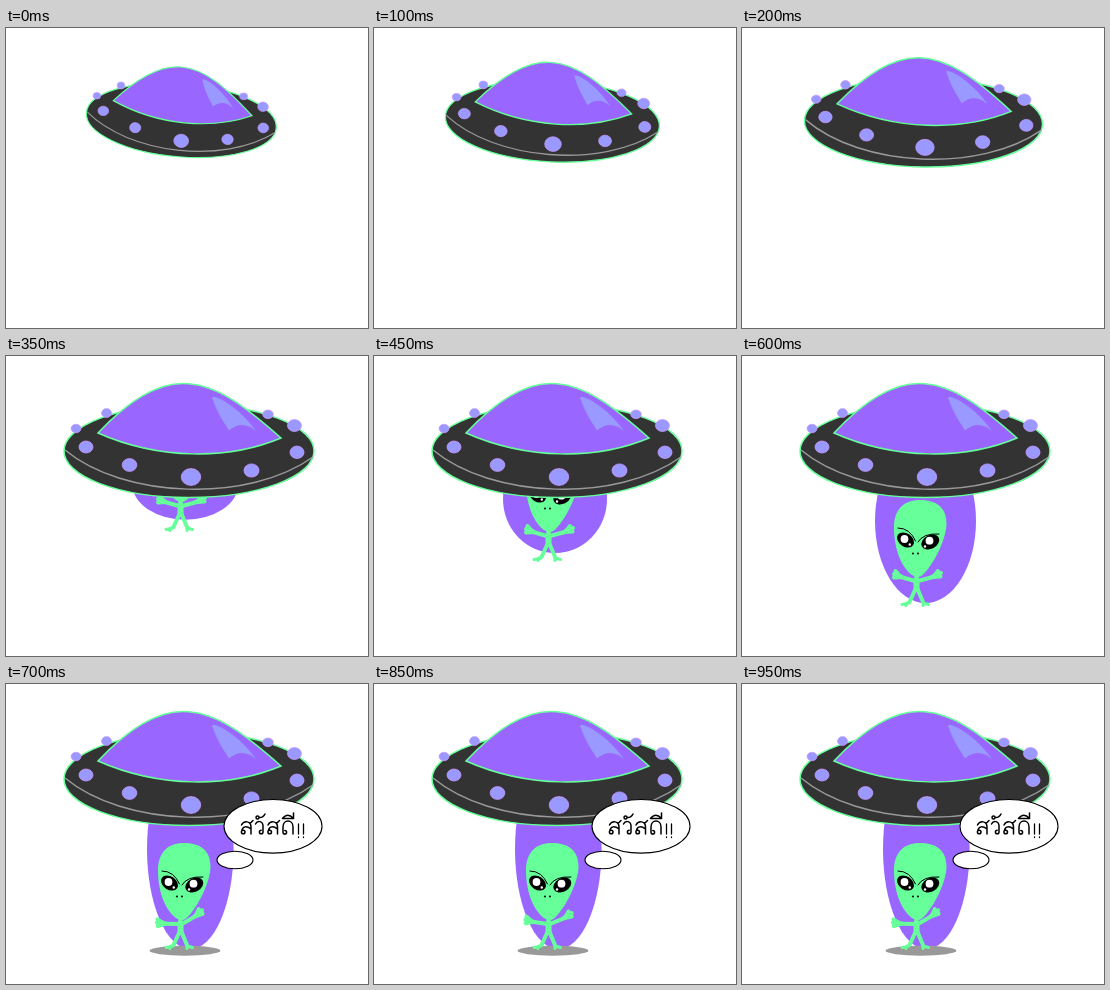
An HTML page for the animation above (1 s loop, 362 by 300 pixels).

```html
<!DOCTYPE html>
<html lang="th">
<head>
<meta charset="utf-8">
<title>Saucer greeting</title>
<style>
  html, body { margin: 0; width: 100%; height: 100%; overflow: hidden; background: #fff; }
  svg { display: block; width: 362px; height: 300px; }
  .line { fill: none; stroke: #000; stroke-linecap: round; stroke-linejoin: round; }
  .limb { fill: none; stroke: #6f9; stroke-linecap: round; stroke-linejoin: round; }
</style>
</head>
<body>
<svg viewBox="0 0 362 300">
  <ellipse id="beam" fill="#96f"/>
  <ellipse id="shadow" cx="179" cy="266.700" rx="35.500" ry="5" fill="#999"/>

  <g id="alien">
    <g class="limb">
      <path stroke-width="4" d="M174.500 219V234M173 234L167.500 246M176 234L181 246"/>
      <path stroke-width="6" d="M174.500 224V233"/>
      <path stroke-width="3" d="M167 247L160 248.500M165 247L164 249.500M181 247L186.500 248.500M181 247V249.500"/>
    </g>
    <g id="armL" class="limb">
      <path stroke-width="4" d="M173 225L159 221"/>
      <path stroke-width="4" d="M160 221L152 221.500M158 219.500L152 218M157 219L153.500 215"/>
    </g>
    <g id="armR" class="limb">
      <path stroke-width="4" d="M176 225L191 221"/>
      <path stroke-width="4" d="M190 221L198.500 220.500M192 219.500L199 217M193 219L196 215"/>
    </g>
    <path fill="#6f9" d="M178 144C196 144 205 153 204.500 169C203 188 189 212 180 219.500Q175 223 170 219C158 210 152 190 152 172C152 153 162 144 178 144Z"/>
    <ellipse rx="9.300" ry="6.600" transform="translate(163.500 184) rotate(35)"/>
    <ellipse rx="9.500" ry="6.800" transform="translate(188.300 186) rotate(-28)"/>
    <g fill="#fff">
      <circle cx="162.500" cy="183" r="3.900"/>
      <circle cx="187.500" cy="184.700" r="3.900"/>
      <circle cx="167.800" cy="188.500" r="1.200"/>
      <circle cx="183" cy="190.500" r="1.200"/>
    </g>
    <path class="line" d="M156 172Q168 172 173.500 185M176 186Q181 177 197 178"/>
    <circle cx="171" cy="197.500" r="1"/>
    <circle cx="176" cy="197.500" r="1"/>
  </g>

  <g id="saucer">
    <ellipse cx="183" cy="95" rx="125" ry="46.500" fill="#333" stroke="#6f9" stroke-width="1.500"/>
    <path d="M59 94C118 143 243 147 307 101" fill="none" stroke="#999" stroke-width="1.500"/>
    <path d="M92 77C122 45 150 27.500 177 27.500C209 27.500 238 49 275 82C223 104 153 104 92 77Z" fill="#96f" stroke="#6f9" stroke-width="1.500"/>
    <path d="M206 41C209 53 217 65 223 74.500C231 67 241 67 250 75C241 61 221 44 209 41Z" fill="#99f"/>
    <g id="lights" fill="#99f" stroke="#c9f" stroke-width=".8"></g>
  </g>

  <g id="bubble">
    <g fill="#fff" stroke="#000" stroke-width="1.100">
      <ellipse cx="267" cy="142.300" rx="49" ry="26.800"/>
      <ellipse cx="229" cy="176" rx="18" ry="8.800"/>
    </g>
    <!-- handwritten greeting -->
    <g class="line" stroke-width="1.500" role="img" aria-label="สวัสดี!!">
      <defs>
        <path id="so" d="M.5 4C3 -1 10 0 10 6V13M1 9C2 5 6 5 10 8M9 2.500L12 -.5M4 11a1.800 1.800 0 1 1 -3.600 0a1.800 1.800 0 1 1 3.600 0"/>
      </defs>
      <use href="#so" x="235" y="137"/>
      <path d="M249.500 140C251.500 136 257 137 257 142V148a1.800 1.800 0 1 1 -1.800 -1.800"/>
      <path d="M253 133.500a1.500 1.500 0 1 1 -3 0a1.500 1.500 0 1 1 3 0Q257 134 259 130"/>
      <use href="#so" x="261.500" y="137"/>
      <path d="M287 150V143C287 135 277 135 277 143V148.200a1.800 1.800 0 1 0 1.800 -1.800"/>
      <path d="M276.500 134.500Q281.500 128 287.500 134.500ZM287.500 134.500V129"/>
      <path stroke-width="1.300" d="M292.500 140V150M292.500 153V153.500M297.500 140V150M297.500 153V153.500"/>
    </g>
  </g>
</svg>
<script>
const el = id => document.getElementById(id);
const set = (id, attrs) => {
  for (const k in attrs) el(id).setAttribute(k, attrs[k]);
};
const show = (id, on) => set(id, { visibility: on ? 'visible' : 'hidden' });
const mix = (a, b, p) => a + (b - a) * p;

// x, y, rx, ry
const lights = [
  [70, 72.5, 5, 4.2], [100.5, 57, 5, 4.4], [80, 91, 7, 6],
  [123.5, 109, 7.3, 6.4], [185, 121, 9.7, 8.4], [245.5, 114.5, 7.5, 6.6],
  [291, 96.3, 7, 6.2], [288.5, 69.5, 7, 6], [262, 58.3, 5.3, 4.3]
];
el('lights').innerHTML = lights.map(([x, y, rx, ry]) =>
  `<ellipse cx="${x}" cy="${y}" rx="${rx}" ry="${ry}"/>`).join('');

function draw(t) {
  const near = Math.min(t / 250, 1);
  set('saucer', { transform:
    `translate(${mix(175.3, 183, near)} ${mix(92.3, 95, near)}) ` +
    `rotate(${mix(4.6, 0, near)}) ` +
    `scale(${mix(.762, 1, near)} ${mix(.787, 1, near)}) translate(-183 -95)` });

  const out = t > 250, greet = t >= 700;
  show('beam', out);
  show('alien', out);
  show('shadow', greet);
  show('bubble', greet);

  const drop = (Math.min(t, 650) - 450) / 150;
  set('beam', greet
    ? { cx: 184.3, cy: 165, rx: 43.3, ry: 100 }
    : { cx: mix(181, 183.5, drop), cy: mix(143, 165, drop),
        rx: mix(52, 50.5, drop), ry: mix(54, 82, drop) });
  set('alien', { transform: `translate(0 ${mix(-45, 0, drop)})` });

  const wave = greet ? -15 + 8 * Math.sin(Math.PI * (t - 700) / 250) : 0;
  set('armL', { transform: `rotate(${wave} 173 225)` });
  set('armR', { transform: `rotate(${wave} 176 225)` });
}

function tick() {
  draw(Math.floor(performance.now() % 1000 / 50) * 50);
  requestAnimationFrame(tick);
}
tick();
</script>
</body>
</html>
```
